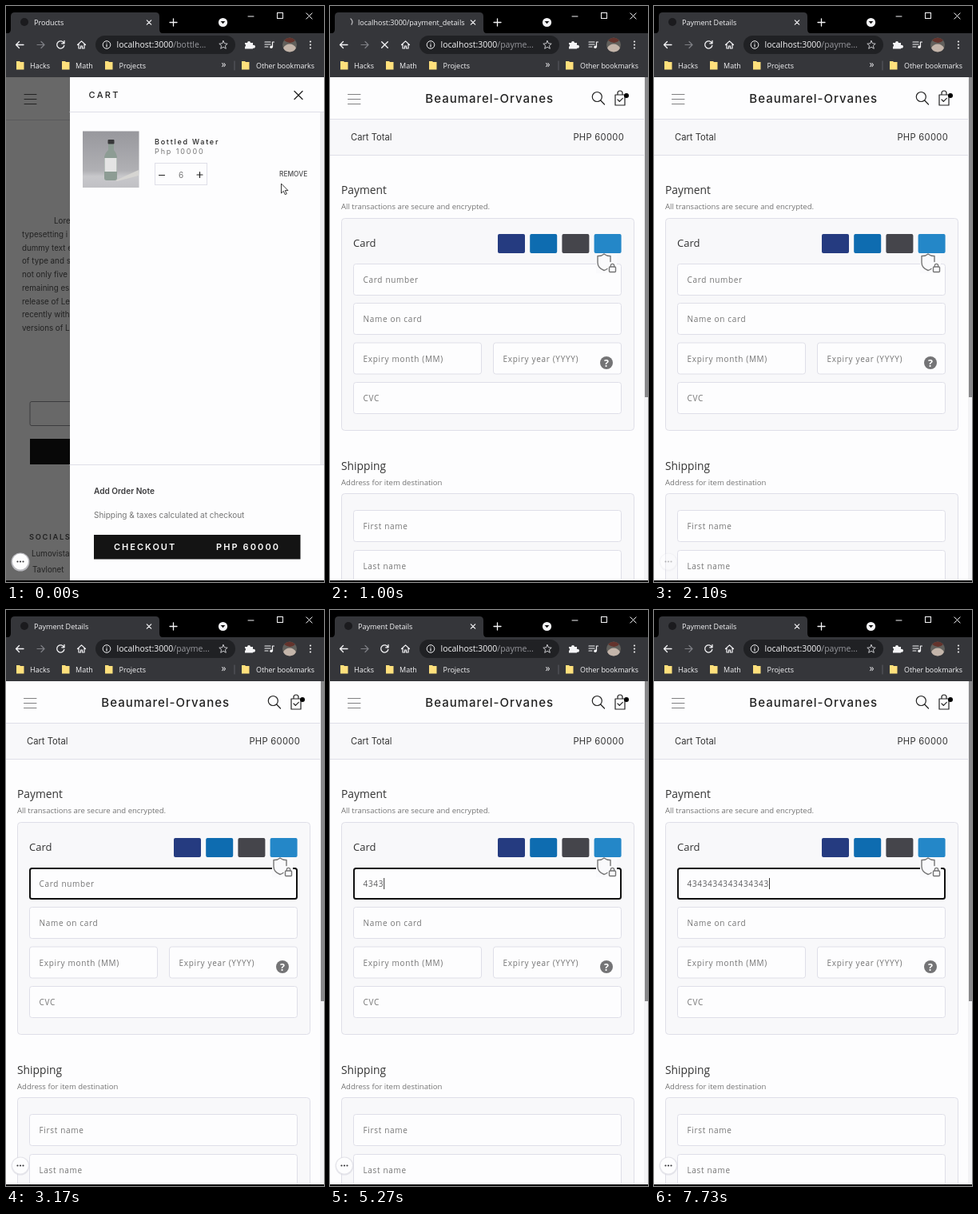
An HTML page that plays this animation: 398x720 px, repeating every 8 s.

```html
<!DOCTYPE html>
<html lang="en">
<head>
<meta charset="utf-8">
<title>Checkout</title>
<style>
html, body { margin: 0; width: 100%; height: 100%; overflow: hidden; background: #000; }
svg { display: block; width: 100vw; height: 100vh; }
text { font-family: Inter, sans-serif; white-space: pre; }
.ui { font-family: "Open Sans", sans-serif; }
.line { fill: none; stroke-linecap: round; stroke-linejoin: round; }
</style>
</head>
<body>
<svg id="stage" viewBox="0 0 398 720"></svg>
<script>
const LOOP = 8000;
const INK = '#222', GREY = '#757575', EDGE = '#dfdfe8', PAGE = '#fdfdfe', BAR = '#35363a';

const rect = (x, y, w, h, fill, extra = '') =>
  `<rect x="${x}" y="${y}" width="${w}" height="${h}" fill="${fill}" ${extra}/>`;
const circle = (x, y, r, fill, extra = '') =>
  `<circle cx="${x}" cy="${y}" r="${r}" fill="${fill}" ${extra}/>`;
const line = (d, stroke, w = 1, extra = '') =>
  `<path class="line" d="${d}" stroke="${stroke}" stroke-width="${w}" ${extra}/>`;
const text = (x, y, s, size, fill, { w = 400, ls = 0, ui = 0, anchor = 'start', id = '' } = {}) =>
  `<text x="${x}" y="${y}" font-size="${size}" fill="${fill}" font-weight="${w}" letter-spacing="${ls}"
    text-anchor="${anchor}" class="${ui ? 'ui' : ''}" ${id && `id="${id}"`}>${s}</text>`;
const ui = (x, y, s, size, fill, opts) => text(x, y, s, size, fill, { ui: 1, ...opts });
const group = (id, body) => `<g id="${id}">${body}</g>`;
const cross = (x, y, r, stroke, w) =>
  line(`M${x - r} ${y - r}l${2 * r} ${2 * r}m0 ${-2 * r}l${-2 * r} ${2 * r}`, stroke, w);
const burger = (x, y, w, stroke) =>
  [0, 6, 12].map(d => line(`M${x} ${y + d}h${w}`, stroke)).join('');

function browser() {
  const white = '#f4f4f6';
  const folder = x => `<path d="M${x} 69h4l1 1h4.500v9.500h-9.500z" fill="#ffe07c"/>`;
  return rect(0, 0, 398, 89, '#000') +
    `<path d="M2 34q4 0 4-5V13q0-5 5-5h176q5 0 5 5v16q0 5 4 5z" fill="${BAR}"/>` +
    rect(0, 34, 398, 55, BAR) +
    circle(23, 20, 5, '#1b1b1e', 'id="favicon"') +
    line('M23 15a5 5 0 0 1 5 5', '#b5b5b8', 1.4, 'id="spinner"') +
    ui(35, 23.7, '', 9.05, white, { id: 'tab' }) +
    cross(179, 20.5, 2.7, white, 1.2) +
    line('M205 20.500h9M209.500 16v9', white, 1.3) +
    circle(271.5, 20.5, 5.6, white) + '<path d="M268.700 19h5.600l-2.800 3.300z" fill="#111"/>' +
    line('M303 13h7', white) + rect(339.5, 8.5, 7, 7, 'none', `stroke="${white}"`) +
    cross(379.5, 12.5, 3.6, white, 1) +
    line('M22 48.500h-9.500m4-4l-4 4l4 4', white, 1.3) +
    line('M39 48.500h9m-4-4l4 4l-4 4', '#7f8085', 1.2) +
    group('reload', line('M72.500 46.500a4.600 4.600 0 1 0 .3 3M73 43.500v3.300h-3.300', white, 1.3)) +
    group('stop', cross(68.5, 48.5, 3.8, white, 1.3)) +
    line('M89.500 48.500l5-4.600l5 4.600M91 47.500v5.500h2.500v-3h2v3h2.500v-5.500', white, 1.2) +
    rect(112, 37, 175, 23, '#202124', 'rx="11.5"') +
    circle(126, 48.5, 4.8, 'none', `stroke="${white}"`) + line('M126 48v3M126 46v.1', white, 1.1) +
    `<text class="ui" x="138.500" y="52.300" font-size="10.500" fill="#f6f6f8">localhost:3000<tspan id="path" fill="#98999e"></tspan></text>` +
    line('M272 43.500l1.500 3.300l3.700.4l-2.800 2.400l.9 3.700l-3.300-2l-3.300 2l.9-3.700l-2.800-2.400l3.700-.4z', '#c8c8cc') +
    `<path d="M299 46h3a2 2 0 1 1 4 0h3v3a2 2 0 1 1 0 3.500v1h-10v-2.500a2 2 0 0 0 0-3.500z" fill="${white}"/>` +
    line('M324 45h7M324 48h7M324 51h4M333.500 51v-6h2', white, 1.2) + circle(332, 51.3, 1.8, white) +
    circle(355, 48.5, 9, '#62605c') + '<path d="M347 52.500a9 9 0 0 0 16 0q-3-5-8-5t-8 5" fill="#c4b5aa"/>' +
    '<path d="M348 43a9 9 0 0 1 14 0q-6 6-14 0" fill="#63332c"/>' +
    [44.5, 48.5, 52.5].map(y => circle(381, y, 1.1, white)).join('') +
    [13, 70, 124, 295].map(folder).join('') +
    ui(30, 77.5, 'Hacks', 9, white) + ui(87, 77.5, 'Math', 9, white) +
    ui(141.5, 77.5, 'Projects', 9, white) + ui(269.5, 77, '»', 12, white) +
    line('M286 69v11', '#5c5d62') + ui(313, 77.5, 'Other bookmarks', 8.9, white);
}

function backdrop() {
  const dark = '#222';
  const copy = ['typesetting i', 'dummy text e', 'of type and s', 'not only five', 'remaining es',
    'release of Le', 'recently with', 'versions of L'];
  return rect(0, 89, 398, 629, '#686868') + burger(23, 110.5, 15, dark) + line('M0 142.500h80', '#5a5a5c') +
    text(60, 272, 'Lorem', 9.8, dark) +
    copy.map((s, i) => text(20, 289 + i * 16.7, s, 9.8, dark)).join('') +
    rect(30, 494.5, 80, 30, 'none', 'stroke="#3c3c3e" rx="2"') + rect(30, 541, 80, 32, '#080808') +
    text(29, 667, 'SOCIALS', 9.3, dark, { w: 600, ls: 1.7 }) +
    text(32, 688, 'Lumovista', 9.8, dark) + text(33, 708, 'Tavlonet', 9.8, dark);
}

function bottle() {
  return `<linearGradient id="wall" x2="0" y2="1"><stop stop-color="#98989d"/><stop offset=".7" stop-color="#b0b0b4"/>
    <stop offset=".8" stop-color="#c8c8cb"/><stop offset="1" stop-color="#c0c0c4"/></linearGradient>` +
    rect(96, 156.5, 70.5, 70.5, 'url(#wall)') +
    '<path d="M137 218l29-13v7l-27 7z" fill="#d6d5d2"/>' +
    '<path d="M128 172h7v8q4 5 4 10v25q0 3-3 3h-10q-3 0-3-3v-25q0-5 5-10z" fill="#8d9c94"/>' +
    rect(123.5, 190, 15, 17, '#e4e4e4') + rect(127.5, 167, 8, 5.5, '#38383a', 'rx="1"');
}

function cart() {
  return rect(80, 89, 318, 629, PAGE) + text(103.5, 115, 'CART', 11, INK, { w: 500, ls: 2.3 }) +
    cross(366, 111.5, 5, INK, 1.3) + line('M80 132.500h318M80 573.500h318', EDGE) +
    rect(393, 133, 4.5, 440, '#ececf0') + bottle() +
    text(186, 172.5, 'Bottled Water', 9, INK, { w: 500, ls: 1.75 }) +
    text(186, 185.3, 'Php 10000', 9, GREY, { ls: 1.9 }) +
    rect(186.5, 196.5, 65, 27, 'none', `stroke="${EDGE}"`) +
    line('M191.500 211.500h7M239 211h7M242.500 207.500v7', INK, 1.2) +
    text(219, 215, '6', 10, GREY, { anchor: 'middle' }) +
    text(342, 213, 'REMOVE', 8.4, '#4c4c4e', { w: 500 }) +
    text(110, 609.7, 'Add Order Note', 10.1, '#3a3a3c', { w: 600 }) +
    text(110, 640, 'Shipping &amp; taxes calculated at checkout', 10, GREY) +
    rect(110, 661, 258.5, 30.5, '#000', 'id="button"') +
    text(135, 680, 'CHECKOUT', 11, '#fff', { w: 600, ls: 2 }) +
    text(263, 680, 'PHP 60000', 11, '#fff', { w: 600, ls: 2.1 });
}

const field = (x, y, w, label, id = '') =>
  rect(x + .5, y + .5, w - 1, 39, '#fdfdfe', `stroke="${EDGE}" rx="3"`) +
  ui(x + 12.5, y + 24.2, label, 10, GREY, { ls: .68, id: id && id + 'Text' });

function payment() {
  const panel = (y, h) => rect(14.5, y + .5, 366, h, '#f8f8fa', `stroke="${EDGE}" rx="4"`);
  const heading = (y, title, note) =>
    ui(14, y, title, 13.8, '#333') + ui(14, y + 19.2, note, 9.55, GREY);
  const cards = ['#253b80', '#0e6cb0', '#45454b', '#2487c8'];
  return rect(0, 89, 398, 629, PAGE) + burger(22.5, 110.5, 15.5, '#808082') +
    text(199.7, 121, 'Beaumarel-Orvanes', 15, INK, { w: 500, ls: 1, anchor: 'middle' }) +
    circle(334.3, 113.5, 6, 'none', `stroke="${INK}" stroke-width="1.2"`) + line('M338.700 118l4.800 5', INK, 1.2) +
    line('M357 111h12v13h-12zM360 111v-2a3 3 0 0 1 6 0v2M360 117l2.300 2.300l4-4', INK, 1.2) +
    circle(371, 112, 3, '#000') +
    rect(0, 141, 393, 46, '#f8f8fa') + line('M0 141.500h393M0 186.500h393', EDGE) +
    text(26, 167.7, 'Cart Total', 11.2, '#333') +
    text(368, 167.7, 'PHP 60000', 11.2, '#333', { ls: .3, anchor: 'end' }) +
    heading(235, 'Payment', 'All transactions are secure and encrypted.') + panel(265, 265) +
    ui(29, 301, 'Card', 13, '#333') +
    cards.map((c, i) => rect(210 + i * 40.2, 285, 34, 24, c, 'rx="2"')).join('') +
    field(29, 322, 336, 'Card number', 'number') +
    rect(30, 323, 334, 38, 'none', 'id="focus" stroke="#111" stroke-width="2" rx="2.5"') +
    rect(0, 0, .9, 14, INK, 'id="caret"') +
    rect(333, 310, 26, 24, '#fafafc') +
    line('M343 310q4 3 8 2.500v7M347 328.500q-2 1.500-4 2q-8-3-8-10v-8q5 .3 8-2.500', GREY, 1.4) +
    rect(349.5, 326, 8, 6.5, 'none', `stroke="${GREY}" stroke-width="1.4" rx="1"`) +
    line('M351.300 326v-1.500a2.200 2.200 0 0 1 4.400 0v1.500', GREY, 1.2) +
    field(29, 371, 336, 'Name on card') + field(29, 420.5, 161, 'Expiry month (MM)') +
    field(204, 420.5, 161, 'Expiry year (YYYY)') + field(29, 470, 336, 'CVC') +
    circle(346, 446, 8, '#747476') + ui(346, 450.5, '?', 12.5, '#fff', { w: 700, anchor: 'middle' }) +
    heading(579.7, 'Shipping', 'Address for item destination') + panel(609, 140) +
    field(29, 630, 336, 'First name') + field(29, 680, 336, 'Last name') +
    rect(393, 89, 5, 629, '#f3f3f5') + rect(394, 89, 4, 400, '#88888a');
}

const chat = circle(18, 695, 11.5, '#dcdce2', 'opacity=".7"') + circle(18, 694.5, 10, '#fdfdfe') +
  [14.5, 18, 21.5].map(x => circle(x, 694.5, 1.1, '#3a3a3c')).join('');
const arrow = `<path d="M0 0v12l2.800-2.600l2 4.300l2-.9l-2-4.200h3.700z" fill="#fff" stroke="${INK}" stroke-width=".9"/>`;
const hand = `<path d="M0 1q1.300-2 2.600 0v5q4.500-.5 7 1.500v4q0 2-1.500 4v2h-7v-2l-4.500-6q0-2 3.400 0z" fill="#fff" stroke="${INK}" stroke-width=".9"/>`;

stage.innerHTML = group('cartPage', backdrop() + cart()) + group('payPage', payment()) +
  group('bubble', chat) + rect(0, 718, 398, 2, '#000') + browser() +
  group('cursor', group('arrow', arrow) + group('hand', hand));

const $ = id => document.getElementById(id);
const show = (id, on) => $(id).setAttribute('display', on ? 'inline' : 'none');
const attr = (id, values) => Object.entries(values).forEach(([k, v]) => $(id).setAttribute(k, v));
const clamp = (t, a, b) => Math.min(1, Math.max(0, (t - a) / (b - a)));
const ease = p => p * p * (3 - 2 * p);

const CLICK = 730, LOAD = 1000, READY = 1300, FOCUS = 2670;
// [time, digits in the card number]
const TYPED = [[FOCUS, 0], [4500, 1], [4800, 2], [5030, 3], [5130, 4], [6770, 6], [6800, 8],
  [7270, 9], [7300, 10], [7370, 11], [7400, 12], [7730, 16]];

function draw(t) {
  const paying = t >= LOAD, loading = t >= CLICK && t < READY;
  show('cartPage', !paying);
  show('payPage', paying);

  $('tab').textContent = t < CLICK ? 'Products' : loading ? 'localhost:3000/payment_details' : 'Payment Details';
  $('path').textContent = t < CLICK ? '/bottle...' : '/payme...';
  show('favicon', !loading);
  show('spinner', loading);
  show('reload', !loading);
  show('stop', loading);
  attr('spinner', { transform: `rotate(${(t - 900) * .36} 23 20)` });

  const p = ease(clamp(t, 30, 680));
  const x = 344.5 - 150.5 * p, y = 222 + 434 * p, hover = y > 650;
  attr('cursor', { transform: `translate(${x} ${y})` });
  show('cursor', !paying);
  show('arrow', !hover);
  show('hand', hover);
  attr('button', { fill: hover ? '#000' : '#141414' });

  attr('bubble', { opacity: paying ? clamp(t, 2000, 2330) : 1 });

  const focused = t >= FOCUS;
  attr('focus', { opacity: !focused ? 0 : t < 2700 ? .5 : 1 });
  const [since, count] = TYPED.filter(k => k[0] <= t).pop() || [0, 0];
  $('numberText').textContent = count ? '43'.repeat(8).slice(0, count) : 'Card number';
  attr('numberText', { fill: count ? '#58585a' : GREY });
  attr('caret', { x: 41.7 + count * 6.4, y: 335 });
  show('caret', focused && (t - since) % 1000 < 500);
}

const start = performance.now();
function tick() {
  draw((performance.now() - start) % LOOP);
  requestAnimationFrame(tick);
}
tick();
</script>
</body>
</html>
```
